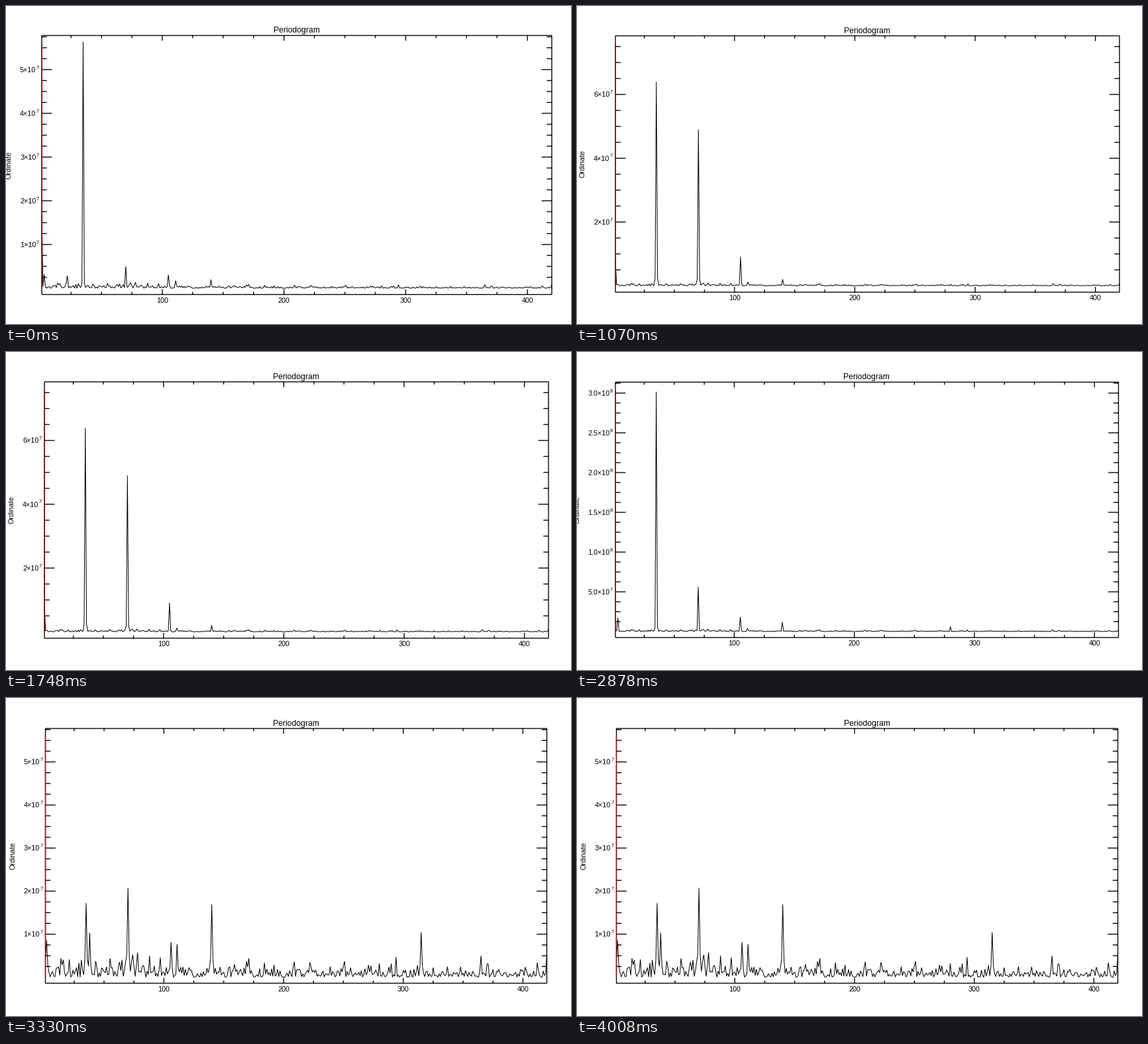
These frames come from a looping animation (853 by 480 pixels, 4460 ms). A matplotlib script:

```python
import matplotlib.pyplot as plt
import numpy as np
from matplotlib.animation import FuncAnimation

W, H, DPI = 853, 480, 64
LOOP, STEP = 4460, 10
STARTS = (1070, 2200, 3330)
BINS = 420
PX = 72 / DPI  # one pixel in points
RED = "#9c1018"

# box: left, top, right, bottom; zero: y of ordinate 0; major: pixels per labelled tick
# unit: labelled step in 1e7; noise: mean level at high frequencies, extra at low ones
# peaks: bin -> height in pixels; spread: share of a peak in the bins beside it
PAGES = [
    dict(box=(54, 44.5, 824, 435.5), zero=426, major=66, unit=1, decimals=0, name_x=7.5,
         noise=(0.9, 3), spread=0.02,
         peaks={1: 110, 3: 21, 22: 19, 35: 372, 70: 33, 105: 20, 140: 13}),
    dict(box=(58, 45, 819, 432), zero=422.4, major=96.3, unit=2, decimals=0, name_x=12,
         noise=(0.6, 1.2), spread=0.04,
         peaks={1: 38, 35: 308, 70: 236, 105: 44, 140: 10}),
    dict(box=(58, 45.5, 817.5, 431), zero=422, major=60, unit=5, decimals=1, name_x=3.5,
         noise=(0.5, 1), spread=0.02,
         peaks={3: 21, 35: 362, 70: 67.5, 105: 22, 140: 14.5, 280: 7.5}),
    dict(box=(59.5, 46, 816.5, 430.5), zero=421.5, major=65, unit=1, decimals=0, name_x=14,
         noise=(6, 8), spread=0.25,
         peaks={2: 56, 35: 112, 38: 67, 70: 135, 106: 53, 140: 110, 315: 68}),
]

plt.rcParams["font.family"] = "Liberation Sans"
plt.rcParams["path.simplify"] = False
fig = plt.figure(figsize=(W / DPI, H / DPI), dpi=DPI, facecolor="white")
ax = fig.add_axes([0, 0, 1, 1])
ax.set(xlim=(0, W), ylim=(H, 0))
ax.axis("off")


def stroke(xs, ys, width, color="black"):
    return ax.plot(xs, ys, color=color, lw=width * PX, snap=False,
                   solid_joinstyle="miter", solid_capstyle="butt")[0]


def write(x, y, text, size=10.8, ha="center", **options):
    return ax.text(x, y, text, fontsize=size * PX, ha=ha, va="baseline", **options)


def spectrum(noise, spread, peaks):
    rng = np.random.default_rng(5)
    bins = np.arange(1, BINS + 1)
    tail, low = noise
    heights = (tail + low * np.exp(-bins / 120)) * rng.exponential(1, BINS)
    for center, height in peaks.items():
        distance = np.abs(bins - center)
        shape = np.where(distance == 0, 1, np.where(distance == 1, spread, 0))
        heights = np.maximum(heights, height * shape)
    return bins, heights


def build(box, zero, major, unit, decimals, name_x, **signal):
    left, top, right, bottom = box
    to_x = lambda k: left + (k - 1) * (right - left) / (BINS - 1)
    segments = [((left, right), (top, top)), ((left, right), (bottom, bottom)),
                ((left, left), (top, bottom)), ((right, right), (top, bottom))]
    artists = []

    for k in range(25, BINS, 25):
        x, size = to_x(k), 4
        if k % 100 == 0:
            size = 8
            artists.append(write(x, bottom + 12.3, str(k)))
        segments += [((x, x), (top, top + size)), ((x, x), (bottom, bottom - size))]

    for i in range(1, int(4 * (zero - top) / major) + 1):
        y, size = zero - i * major / 4, 7.7
        if i % 4 == 0:
            size, value = 15.4, i // 4 * unit
            power = 7 if value < 10 else 8
            mantissa = f"{value / 10 ** (power - 7):.{decimals}f}"
            artists.append(write(left - 8.7, y + 3.8, f"{mantissa}×10", ha="right"))
            artists.append(write(left - 4.2, y - 1.3, str(power), 7.4, ha="right"))
        segments += [((left, left + size), (y, y)), ((right, right - size), (y, y))]

    xs = np.concatenate([(*sx, np.nan) for sx, _ in segments])
    ys = np.concatenate([(*sy, np.nan) for _, sy in segments])
    bins, heights = spectrum(**signal)
    return artists + [
        stroke(xs, ys, 1.35),
        stroke(to_x(bins), zero - heights, 1),
        stroke((left, left), (top + 12, zero), 1.4, RED),
        write((left + right) / 2 - 0.4, top - 4.4, "Periodogram", 12.1),
        write(name_x, (top + bottom) / 2, "Ordinate", rotation=90, rotation_mode="anchor"),
    ]


pages = [build(**page) for page in PAGES]


def update(frame):
    current = sum(frame * STEP >= start for start in STARTS)
    for i, artists in enumerate(pages):
        for artist in artists:
            artist.set_visible(i == current)
    return pages[current]


animation = FuncAnimation(fig, update, frames=LOOP // STEP, interval=STEP,
                          init_func=lambda: update(0), repeat=True, repeat_delay=0)
plt.show()
```
